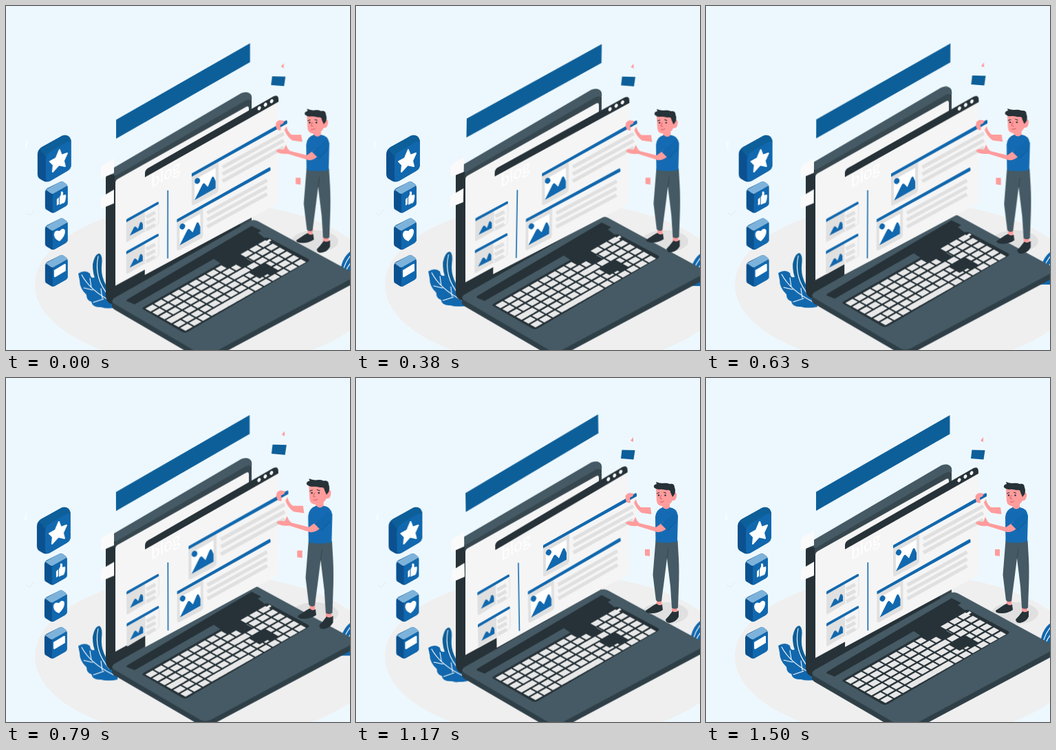
Animation of 500 by 500 pixels, one loop 1.54 s. Source, as an HTML page:

```html
<!DOCTYPE html>
<html lang="en">
<head>
<meta charset="utf-8">
<title>Blog</title>
<style>
html, body { margin: 0; width: 100%; height: 100%; overflow: hidden; background: #edf8fe; }
svg { display: block; width: 100vw; height: 100vh; }
.float, .wind, .beat, .shake { animation: float 1540ms linear -31ms infinite; }
.wind { animation-name: wind; transform-origin: 274px 222px; }
.plants { transform-origin: 312px 395px; }
.beat { animation-name: beat; transform-origin: 372px 222px; }
.shake { animation-name: shake; }
@keyframes float { 50% { transform: translateY(-10px); } }
@keyframes wind {
  0%, 100% { transform: rotate(0deg); }
  25% { transform: rotate(1deg); }
  75% { transform: rotate(-1deg); }
}
@keyframes beat {
  0%, 30%, 40%, 60%, 100% { transform: scale(1); }
  10%, 50% { transform: scale(1.1); }
}
@keyframes shake {
  0%, 100% { transform: translateX(0); }
  10%, 90% { transform: translateX(-1px); }
  20%, 79% { transform: translateX(2px); }
  30%, 50%, 69.5% { transform: translateX(-4px); }
  40%, 59.5% { transform: translateX(4px); }
}
.blue { fill: #1168ae; }
.deep { fill: #0d5f99; }
.dark { fill: #263238; }
.slate { fill: #455a64; }
.paper { fill: #f5f5f5; }
.grey { fill: #e0e0e0; }
.white { fill: #fff; }
.skin { fill: #ff9c9c; }
.line { fill: none; stroke: #e0e0e0; stroke-width: 5; }
.vein { fill: none; stroke: #fff; stroke-width: 1.1; stroke-linecap: round; }
</style>
</head>
<body>
<svg viewBox="0 0 500 500">
  <defs>
    <g id="post">
      <path class="paper" d="M0 3 136-72V-32L0 46Z"/>
      <path class="grey" d="M0 5 38-16V24Q38 27 35 29L3 46Q0 47 0 44Z"/>
      <path class="white" d="M4 10 34-7V22L4 39Z"/>
      <path class="blue" d="M4 39 15 17Q17 13 20 17L23 20 28 8Q30 3 32 7L34 12V22Z"/>
      <ellipse class="blue" cx="8" cy="11.5" rx="3.8" ry="4.4" transform="rotate(30 8 11.5)"/>
      <path class="line" d="M44-8 131-56M44 2 131-46M44 12 131-36"/>
      <path class="blue" d="M0 1 133-74Q136-76 136-73V-70L0 5.5Z"/>
    </g>
    <g id="mini">
      <path class="grey" d="M0 4 27-11V18L2 33Q0 34 0 31Z"/>
      <path class="blue" d="M5 24 11 12Q13 9 15 12L17 14 20 5Q22 2 24 7V14Z"/>
      <path class="line" stroke-width="4" d="M29-3 42-10M29 6 42-1M29 15 42 8"/>
      <path fill="none" stroke="#e0e0e0" d="M27 18 45 8Q47 7 47 4V-21"/>
      <path class="blue" d="M0 1Q0 0 2-1L45-25Q47-26 47-24V-22L0 4.5Z"/>
    </g>
    <g id="cube">
      <path d="M57 270Q57 267 60 265L78 256Q81 254 84 256L88 259Q90 261 90 264V286Q90 289 87 291L71 300Q67 302 64 299L59 296Q57 295 57 292Z" fill="#0b5190"/>
      <path d="M58 267 78 256Q81 254 84 256L88 259Q90 261 88 262L71 272Q68 274 65 272Z" fill="#7db3db"/>
      <path class="blue" d="M68 276Q68 274 70 272L87 263Q90 261 90 264V286Q90 289 87 291L71 300Q68 302 68 298Z"/>
    </g>
  </defs>

  <rect width="500" height="500" fill="#edf8fe"/>
  <ellipse cx="292" cy="405" rx="250" ry="120" fill="#efefef"/>
  <ellipse class="grey" cx="449" cy="342" rx="34" ry="16"/>

  <g class="wind plants">
    <path class="deep" d="M150 425Q125 402 126 376Q129 360 136 360Q141 363 139 378Q137 400 156 420Z"/>
    <path class="blue" d="M105 389Q115 383 122 389Q123 398 130 394Q137 398 138 409Q152 410 162 428V438Q148 441 138 438Q126 439 124 430Q117 428 117 420Q107 411 107 399Z"/>
    <path class="vein" d="M134 364Q127 396 150 422M110 391Q122 414 156 431M122 396 124 409M113 410 126 413M138 411 140 425M127 431 142 426"/>
    <path class="blue" d="M508 352Q488 361 486 386V404H510Z"/>
    <path class="vein" d="M505 358Q492 370 489 389M503 371Q496 378 493 388"/>
  </g>

  <g class="float">
    <path class="dark" d="M145 251Q145 243 151 239L160 234 344 128Q356 124 357 134V312L160 432Q154 436 149 431Q145 427 145 421Z"/>
    <path class="slate" d="M147 245Q149 240 154 237L342 127Q351 123 356 129Q358 132 357 138L352 142 160 249Q157 244 147 245Z"/>
    <path fill="#37474f" d="M158 248 348 138Q357 134 357 142V312L340 322 352 148 158 257Z"/>
    <path class="paper" d="M159 258Q159 254 162 252L349 147Q353 145 353 149V301L159 407Z"/>

    <path fill="#2f3f47" d="M154 428V438Q156 441 160 443L282 514Q290 518 298 514L512 400V389Z"/>
    <path class="slate" d="M157 425 354 313Q360 310 366 313L506 389Q511 392 505 395L298 506Q290 510 282 506L157 433Q152 429 157 425Z"/>
    <path class="dark" d="M176 427Q174 429 177 430L187 434 302 368 314 376 379 340 366 330 371 327 357 320Z"/>
    <path class="dark" d="M199 441Q197 440 200 438L375 338Q379 336 383 338L439 368Q442 370 439 372L264 474Q260 476 256 474Z"/>
    <g transform="matrix(12.7 -7.25 10.15 5.6 200 440.3)">
      <path fill="none" stroke="#e8e8e8" stroke-width=".76" stroke-dasharray=".83 .17" d="M.1 .5H8.8M11 .5H14M.1 1.5H13.9M.1 2.5H13.9M.1 3.5H13.9M.1 4.5H13.9M.1 5.5H13.9"/>
      <path fill="#e8e8e8" d="M3.5 5.12H7.8V5.88H3.5ZM.1 3.12H1.6V3.88H.1ZM8.4 2.12H9.9V2.88H8.4Z"/>
      <path class="dark" d="M9.6 3H11.5V5H10.5V4.6H9.6ZM9.7 0H10.9V2H9.7Z"/>
    </g>
    <path class="paper" d="M377 343 383 339 386 341 380 345Z"/>
  </g>

  <g class="wind">
    <path class="deep" d="M160 165.5 354.5 54V81.5L160 193Z"/>
    <path fill="#fafafa" d="M138 236Q138 233 141 231L157 222V243L138 251ZM138 280Q138 278 140 277L157 267V287L138 295Z"/>
    <path class="paper" d="M202 246 396 138V284Q396 287 393 288L202 391Z"/>
    <path class="dark" d="M202 243Q202 239 206 236L389 131Q396 128 396 136V139L202 249Z"/>
    <g class="white">
      <ellipse cx="368" cy="148.5" rx="2.2" ry="3" transform="rotate(28 368 148.5)"/>
      <ellipse cx="377" cy="143.3" rx="2.2" ry="3" transform="rotate(28 377 143.3)"/>
      <ellipse cx="386" cy="138.2" rx="2.2" ry="3" transform="rotate(28 386 138.2)"/>
    </g>
    <text class="white" transform="matrix(.87 -.5 0 1 211 265)" font-family="Lato, sans-serif" font-size="26">blog</text>
    <path fill="none" stroke="#1168ae" stroke-width="1.6" d="M235.3 268V367"/>
    <use href="#mini" x="175" y="310"/>
    <use href="#mini" x="175" y="356.5"/>
    <use href="#post" x="248.5" y="309"/>
  </g>

  <g class="beat">
    <use href="#post" x="272" y="242"/>
    <path class="skin" d="M399 91 403 86V93ZM420 249H427V259L420 258Z"/>
    <path class="deep" d="M386.500 104.500 405.500 105 403.500 118.500 385 117Z"/>

    <path class="skin" d="M392 177Q390 169 397 167L404 168 402 172 398 174 399 181Q394 183 392 177ZM407 176Q408 183 414 188L428 188 429.500 198 415 196Q407 190 404 181Z"/>
    <path class="skin" d="M437 315H445L444 331H437ZM459 328H467V342H459Z"/>
    <path class="dark" d="M421 338 433 330 437 328Q441 332 445 329L446 337Q439 342 430 342Q420 342 421 338ZM450 351Q455 346 460 339Q464 342 469 338L469 347Q466 353 460 355Q451 358 450 351Z"/>
    <path class="slate" d="M435.500 236H467.500L469 262Q470 282 469 306L468 334Q463 337 459 334L457 303 452 262 448 294 444 324Q440 327 436 323L431.500 286Z"/>
    <path fill="none" stroke="#37474f" d="M452 262 454 248"/>
    <path class="skin" d="M446 180H456V190Q450 195 445 189Z"/>
    <path fill="#156bb3" d="M435 202Q436 191 446 188Q451 193 456 188Q466 189 468 200L467 238Q451 241 435.500 238Z"/>
    <path class="skin" d="M436 217 447 209 454 216Q446 225 438 224L409 215Q396 216 392 211Q393 207 403 209L406 202 409 208 412 211Z"/>
    <path fill="#1168ae" d="M462 195Q470 201 466 209L453 222 443 212 458 201Z"/>
    <path fill="none" stroke="#0d5591" stroke-width=".8" d="M453 222 465 209"/>

    <path class="skin" d="M436 161H461V166Q467 165 466 172Q465 179 460 178Q457 185 448 186Q438 187 437 179Z"/>
    <path class="dark" d="M433 159Q432 155 437 154L436 151Q441 153 445 153Q452 152 456 154Q463 153 463 159Q465 164 463 169L460 173 457 166Q457 162 451 163Q444 161 440 162Q436 162 433 159Z"/>
    <path fill="none" stroke="#263238" d="M437 168 441 166.500M447 166 451 167.500"/>
    <g class="dark"><circle cx="440" cy="170.500" r="1.200"/><circle cx="449.500" cy="170.500" r="1.200"/></g>
    <path fill="none" stroke="#d85f68" d="M444 170 442 175 445 176M442 180Q445 181 448 179"/>
  </g>

  <g class="shake">
    <path fill="none" stroke="#fff" stroke-width="2" opacity=".6" d="M31 197Q28 202 30 207"/>
    <path fill="none" stroke="#dbe8ef" stroke-width=".8" d="M30 301 36 304 42 296"/>
    <path fill="#0b5190" d="M46 216Q46 209 52 205L81 189Q87 186 92 190Q95 193 95 199V230Q95 237 89 240L65 254Q59 257 54 254L49 251Q46 249 46 244Z"/>
    <path class="deep" d="M49 208 81 189Q87 186 92 190L95 196 65 214 58 219Z"/>
    <path class="blue" d="M58 224Q58 216 64 212L88 198Q95 195 95 202V230Q95 237 89 240L65 254Q58 257 58 250Z"/>
    <path class="white" stroke="#fff" stroke-width="2" stroke-linejoin="round" d="M78 209 81 217 89 214 84 225 86 233 77 231 68 241 69 231 64 226 73 221Z"/>
    <use href="#cube"/>
    <use href="#cube" y="53.500"/>
    <use href="#cube" y="107"/>
    <path class="white" d="M74 281 77 278V288L74 290ZM78 278 80 274 80 270Q84 268 83 275L87 274Q88 277 86 284Q85 287 82 287L78 289Z"/>
    <path class="white" d="M78 342Q70 339 70 332Q71 325 78 327Q83 321 86 326Q87 334 78 342Z"/>
    <path class="white" d="M70 384 85 375Q87 374 87 376V385L72 394Q70 395 70 392Z"/>
  </g>
</svg>
</body>
</html>
```
